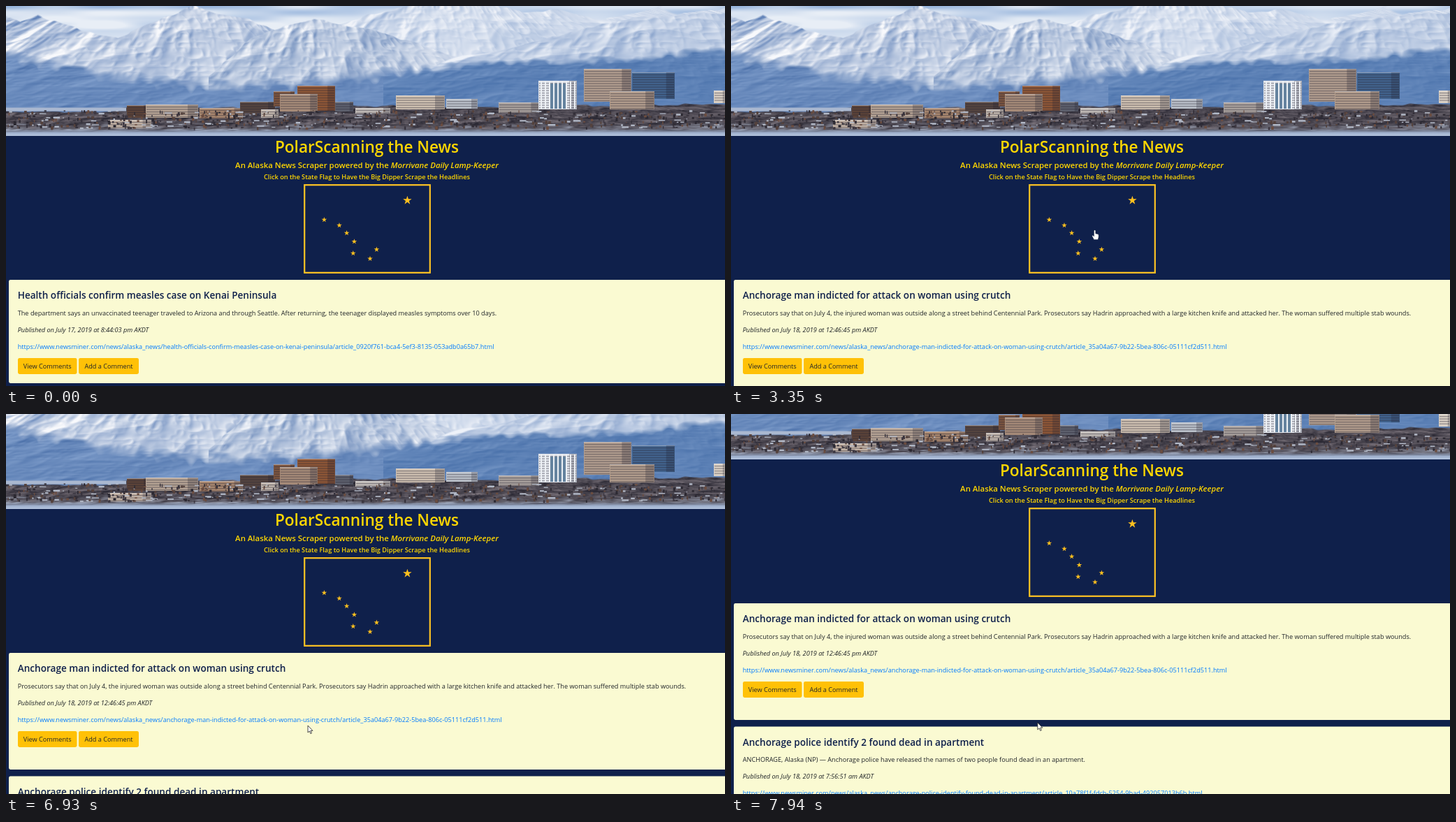
Animation of 1029 by 544 pixels, one loop 8000 ms. Source, as an HTML page with a canvas:

```html
<!DOCTYPE html>
<html lang="en">
<head>
<meta charset="utf-8">
<title>PolarScanning the News</title>
<style>
  html, body { margin: 0; width: 100%; height: 100%; overflow: hidden; background: #0f204b; }
  #stage { position: relative; width: 100%; height: 100%; overflow: hidden; contain: strict; }
  #stage canvas, #stage svg { position: absolute; left: 0; top: 0; }
  text { font: 9.17px "Open Sans", "Noto Sans", sans-serif; fill: #212529; white-space: pre; }
  .banner { font-weight: 600; fill: #ffd700; text-anchor: middle; }
  .headline { font-size: 13.58px; font-weight: 600; fill: #0f204b; }
  .date { font-style: italic; }
  .link { fill: #007bff; }
  .label { text-anchor: middle; }
</style>
</head>
<body>
<div id="stage">
  <canvas id="photo" width="1029" height="186"></canvas>
  <svg width="1029" height="544">
    <g id="page">
      <text class="banner" x="516.5" y="209.7" style="font-size:22.6px">PolarScanning the News</text>
      <text class="banner" x="516.5" y="231.5" style="font-size:11.4px">An Alaska News Scraper powered by the <tspan font-style="italic">Morrivane Daily Lamp-Keeper</tspan></text>
      <text class="banner" x="516.5" y="248.4" style="font-size:9.2px">Click on the State Flag to Have the Big Dipper Scrape the Headlines</text>
      <rect x="427.2" y="256.2" width="179.6" height="125.6" fill="none" stroke="#ffc423" stroke-width="2.2"/>
      <path id="stars" fill="#ffc01e"/>
      <g id="before"></g>
      <g id="after"></g>
    </g>
    <circle id="click" cx="519.5" cy="319.5" r="7.2" fill="#ff0" opacity=".47"/>
    <g id="cursor">
      <path id="hand" fill="#fff" stroke="#0b1430" stroke-width=".5" d="M-1.2 .6Q0-.8 1.2 .6V5L4.4 5.7Q5.6 6 5.6 7.3V10L4.6 13.6H-1.2L-3.8 8.6Q-3.9 7-2.4 7.6L-1.2 9Z"/>
      <path id="arrow" fill="#fff" stroke="#222" stroke-width=".8" d="M0 0V10L2.3 8L3.9 11.6L5.5 10.9L3.9 7.4H7Z"/>
      <path id="beam" fill="none" stroke="#333" stroke-width=".9" d="M-2-5H-.6L0-4.5L.6-5H2M0-4.5V4.5M-2 5H-.6L0 4.5L.6 5H2"/>
    </g>
  </svg>
</div>
<script>
const $ = id => document.getElementById(id);
const clamp = v => Math.max(0, Math.min(1, v));
const mix = (a, b, p) => a + (b - a) * p;

// ---- Banner photograph: relief-shaded noise for the land, rectangles for the city ----
const W = 1029, H = 186;
const ctx = $('photo').getContext('2d');

function hash(i, j) {
  let h = Math.imul(i, 374761393) + Math.imul(j, 668265263);
  h = Math.imul(h ^ h >>> 13, 1274126177);
  return ((h ^ h >>> 16) >>> 0) / 2 ** 32;
}
function noise(x, y) {
  const i = Math.floor(x), j = Math.floor(y);
  const ease = v => v * v * (3 - 2 * v);
  const u = ease(x - i), v = ease(y - j);
  return mix(mix(hash(i, j), hash(i + 1, j), u), mix(hash(i, j + 1), hash(i + 1, j + 1), u), v);
}
function ridged(x, y) {
  let sum = 0;
  for (let k = 0, gain = .5; k < 4; k++, gain /= 2, x *= 2, y *= 2)
    sum += gain * (1 - Math.abs(2 * noise(x + k * 17, y + k * 31) - 1));
  return sum;
}

const rgb = hex => [1, 3, 5].map(i => parseInt(hex.slice(i, i + 2), 16));

// ridge: x,y pairs; slopes fan out below `peak`; `soft` blurs the upper edge.
function land(ridge, light, shade, { peak = 500, sx = 45, sy = 55, relief = 3.6, bias = .1, soft = 2 } = {}) {
  const tops = Array.from({ length: W }, (_, x) => {
    let k = 2;
    while (k < ridge.length - 2 && ridge[k] < x) k += 2;
    if (x < ridge[0] || x > ridge[ridge.length - 2]) return H;
    return mix(ridge[k - 1], ridge[k + 1], (x - ridge[k - 2]) / (ridge[k] - ridge[k - 2]));
  });
  const height = (x, y) => ridged((x - peak) / (1 + y / 110) / sx + 50, y / sy);
  return {
    light: rgb(light), shade: rgb(shade),
    cover: (x, y) => clamp((y - tops[x] + (noise(x / 12, y / 9) - .5) * (2 + soft)) / soft),
    lit: (x, y) => clamp(.5 + bias + relief * (height(x + 1.6, y + .8) - height(x - 1.6, y - .8)))
  };
}

const terrain = [
  land([430, 34, 480, 24, 520, 10, 560, 2, 600, -6, 690, -6, 740, 8, 790, 4, 850, 18, 900, 8, 935, 0, 960, 10, 1029, 2],
    '#f0f3f9', '#93acd2', { peak: 620, bias: .15 }),
  land([0, 14, 20, 22, 45, 12, 80, 24, 120, 36, 160, 46, 200, 26, 240, 10, 268, -2, 300, 8, 340, 16, 400, 40, 470, 90],
    '#f8f9fc', '#6283b8', { peak: 268 }),
  land([290, 100, 350, 45, 400, 28, 440, 17, 470, 24, 520, 32, 580, 50, 640, 70, 700, 96],
    '#f5f7fb', '#5f80b4', { peak: 445, sx: 38 }),
  land([590, 95, 640, 72, 700, 64, 780, 44, 850, 26, 900, 15, 960, 12, 1029, 8],
    '#eef2f9', '#6d8dbf', { peak: 930, sx: 60 }),
  land([0, 64, 90, 76, 160, 92, 240, 100, 300, 106, 400, 102, 520, 92, 600, 82, 700, 110],
    '#89a6d1', '#4a6fa8', { sx: 50, sy: 30, relief: 2.4, bias: 0, soft: 16 }),
  land([540, 104, 600, 88, 660, 78, 740, 74, 820, 76, 900, 70, 1029, 58],
    '#7f9ecb', '#416aa5', { peak: 930, sx: 50, sy: 30, relief: 2.4, bias: -.06, soft: 8 }),
  land([0, 150, 150, 149, 180, 144, 340, 145, 480, 141, 700, 143, 1028, 139],
    '#8a8188', '#2c2a35', { sx: 14, sy: 9, relief: 1.5, bias: -.14, soft: 2 }),
  land([0, 166, 300, 168, 600, 170, 1028, 166],
    '#aab3c6', '#3c363f', { sx: 22, sy: 7, relief: 1.5, bias: -.06, soft: 9 })
];

function paintLand() {
  const image = ctx.createImageData(W, H);
  const skyBlue = rgb('#94b2db'), cloud = rgb('#e8eef6');
  for (let y = 0, at = 0; y < H; y++) for (let x = 0; x < W; x++, at += 4) {
    const haze = clamp(noise(x / 70, y / 9) * .9 + y / 60);
    let color = skyBlue.map((c, i) => mix(c, cloud[i], haze));
    for (const layer of terrain) {
      const alpha = layer.cover(x, y);
      if (!alpha) continue;
      const lit = layer.lit(x, y);
      color = color.map((c, i) => mix(c, mix(layer.shade[i], layer.light[i], lit), alpha));
    }
    image.data.set([...color, 255], at);
  }
  ctx.putImageData(image, 0, 0);
}

function box(x, y, w, h, fill) {
  ctx.fillStyle = fill;
  ctx.fillRect(x, y, w, h);
}
function building(x, y, w, h, color) {
  box(x, y, w, h, color);
  for (let row = y + 3; row < y + h - 1; row += 3.5) box(x + 1, row, w - 2, 1.2, 'rgba(40,36,50,.42)');
  box(x, y, w, 1, 'rgba(235,235,240,.45)');
  box(x + w * .8, y, w * .2, h, 'rgba(30,30,45,.25)');
}

function paintCity() {
  box(0, 145.5, 172, 5, '#aab8d0');
  for (const b of [
    [173, 142, 30, 18, '#5a4238'], [200, 141, 75, 19, '#b5a394'], [277, 146, 62, 15, '#a8876f'],
    [335, 137, 50, 16, '#54443f'], [383, 122, 30, 22, '#7a543f'], [417, 114, 54, 36, '#8d5636'],
    [392, 126, 54, 25, '#a58a78'], [471, 137, 26, 14, '#5c5f6c'], [500, 146, 50, 8, '#c2bcb8'],
    [558, 128, 70, 20, '#cdbfb0'], [630, 133, 45, 14, '#b9bfc8'], [705, 138, 58, 15, '#a8a09c'],
    [762, 107, 55, 41, '#dfe3ea'], [827, 90, 68, 47, '#b09c8e'], [896, 95, 61, 38, '#41628c'],
    [864, 122, 64, 26, '#b19c8c'], [1013, 121, 16, 18, '#d8cfc4'], [146, 163, 62, 12, '#c3b3a6'],
    [365, 148, 25, 12, '#c0b5ac']
  ]) building(...b);
  box(778, 111, 23, 36, '#65839f');
  for (let x = 765; x < 816; x += 6) box(x, 108, 2, 39, '#eef1f5');

  // Small roofs and trees in front of the blocks
  const tints = ['#332f38', '#54423d', '#3d3842', '#b3bac8', '#2c2932', '#6b4d40'];
  for (let n = 0; n < 800; n++) {
    const tree = n % 6 !== 3;
    box(hash(n, 1) * W, 149 + hash(n, 2) * 25, 1 + hash(n, 3) * (tree ? 3 : 10),
      1 + hash(n, 4) * (tree ? 4 : 1.5), tints[n % 6]);
  }
  const shore = ctx.createLinearGradient(0, 177, 0, 186);
  shore.addColorStop(0, 'rgba(125,140,168,.2)');
  shore.addColorStop(.5, '#9fb0cd');
  shore.addColorStop(1, '#b4c4de');
  box(0, 177, W, 9, shore);
}

// ---- Flag and stories ----
function star(x, y, r) {
  let d = '';
  for (let i = 0; i < 10; i++) {
    const a = i * Math.PI / 5, k = i % 2 ? r * .385 : r;
    d += (i ? 'L' : 'M') + (x + k * Math.sin(a)) + ' ' + (y - k * Math.cos(a));
  }
  return d + 'Z';
}

function card(top, height, headline, summary, date, path) {
  const line = (cls, dy, s) => `<text class="${cls}" x="16.7" y="${dy}">${s}</text>`;
  const button = (x, w, s) => `<rect x="${x}" y="112" width="${w}" height="23" rx="2.4" fill="#ffc107"/>
    <text class="label" x="${x + w / 2}" y="127.3">${s}</text>`;
  return `<g transform="translate(0 ${top})">
    <rect x="4" width="1040" height="${height}" rx="2.4" fill="#fafad2"/>` +
    line('headline', 27.2, headline) + line('', 50.5, summary) +
    line('date', 74.6, 'Published on July ' + date + ' AKDT') +
    line('link', 98.8, 'https://www.newsminer.com/news/alaska_news/' + path + '.html') +
    button(17, 84.5, 'View Comments') + button(104, 86, 'Add a Comment') + '</g>';
}

paintLand();
paintCity();
$('stars').setAttribute('d', star(574.4, 278.3, 6.6) + [
  [455.4, 306], [477, 314], [487.6, 325], [498.4, 337.2], [496.8, 354], [521, 361.8], [530.4, 348.6]
].map(([x, y]) => star(x, y, 4)).join(''));

$('before').innerHTML = card(392, 148,
  'Health officials confirm measles case on Kenai Peninsula',
  'The department says an unvaccinated teenager traveled to Arizona and through Seattle. After returning, the teenager displayed measles symptoms over 10 days.',
  '17, 2019 at 8:44:03 pm',
  'health-officials-confirm-measles-case-on-kenai-peninsula/article_0920f761-bca4-5ef3-8135-053adb0a65b7');
$('after').innerHTML = card(392, 167,
  'Anchorage man indicted for attack on woman using crutch',
  'Prosecutors say that on July 4, the injured woman was outside along a street behind Centennial Park. Prosecutors say Hadrin approached with a large kitchen knife and attacked her. The woman suffered multiple stab wounds.',
  '18, 2019 at 12:46:45 pm',
  'anchorage-man-indicted-for-attack-on-woman-using-crutch/article_35a04a67-9b22-5bea-806c-05111cf2d511') +
  card(568.6, 167,
  'Anchorage police identify 2 found dead in apartment',
  'ANCHORAGE, Alaska (NP) — Anchorage police have released the names of two people found dead in an apartment.',
  '18, 2019 at 7:56:51 am',
  'anchorage-police-identify-found-dead-in-apartment/article_10a78f1f-fdcb-5254-9bad-492057013b6b');

// ---- Timeline ----
const scrollSteps = [[0, 0], [6780, 3.6], [6850, 26], [6920, 50], [7000, 60.3],
  [7470, 68.5], [7560, 88], [7630, 110], [7700, 119.5], [7780, 121]];
const stepAt = (steps, t) => steps.filter(s => s[0] <= t).pop();
const stepped = (t, start, end, count) =>
  Math.min(1, Math.floor((t - start) / (end - start) * count + 1e-6) / count);

function cursorAt(t) {
  if (t < 470) return null;
  if (t < 1340) {
    const p = stepped(t, 470, 1260, 10), e = p * p * (3 - 2 * p);
    return [mix(854, 522.5, e), mix(508, 321.5, e)];
  }
  if (t < 6150) return [520.6, 320.8];
  if (t < 6300) return [520, 320.8];
  if (t < 7470) {
    const p = (stepped(t, 6300, 6610, 5) * 5 + 1) / 6;
    return [mix(520, 432, p), mix(320.8, 446, p)];
  }
  return stepAt([[0, 431.3, 445.3], [7780, 434, 444], [7860, 437, 442.4], [7940, 438.8, 441.8]], t).slice(1);
}

function cursorKind(t, [x, y]) {
  if (x > 426 && x < 608 && y > 255 && y < 383) return 'hand';
  return t > 6300 && t < 6850 && y > 434 ? 'beam' : 'arrow';
}

const show = (id, on) => { $(id).style.display = on ? '' : 'none'; };

function frame() {
  const t = performance.now() % 8000;
  const shift = `translateY(${-stepAt(scrollSteps, t)[1]}px)`;
  $('page').style.transform = $('photo').style.transform = shift;
  show('before', t < 2040);
  show('after', t >= 3350);
  show('click', t >= 1720 && t < 2040);
  const at = cursorAt(t);
  show('cursor', at);
  if (at) {
    $('cursor').setAttribute('transform', `translate(${at})`);
    const kind = cursorKind(t, at);
    for (const id of ['hand', 'arrow', 'beam']) show(id, id === kind);
  }
  requestAnimationFrame(frame);
}
frame();
</script>
</body>
</html>
```
